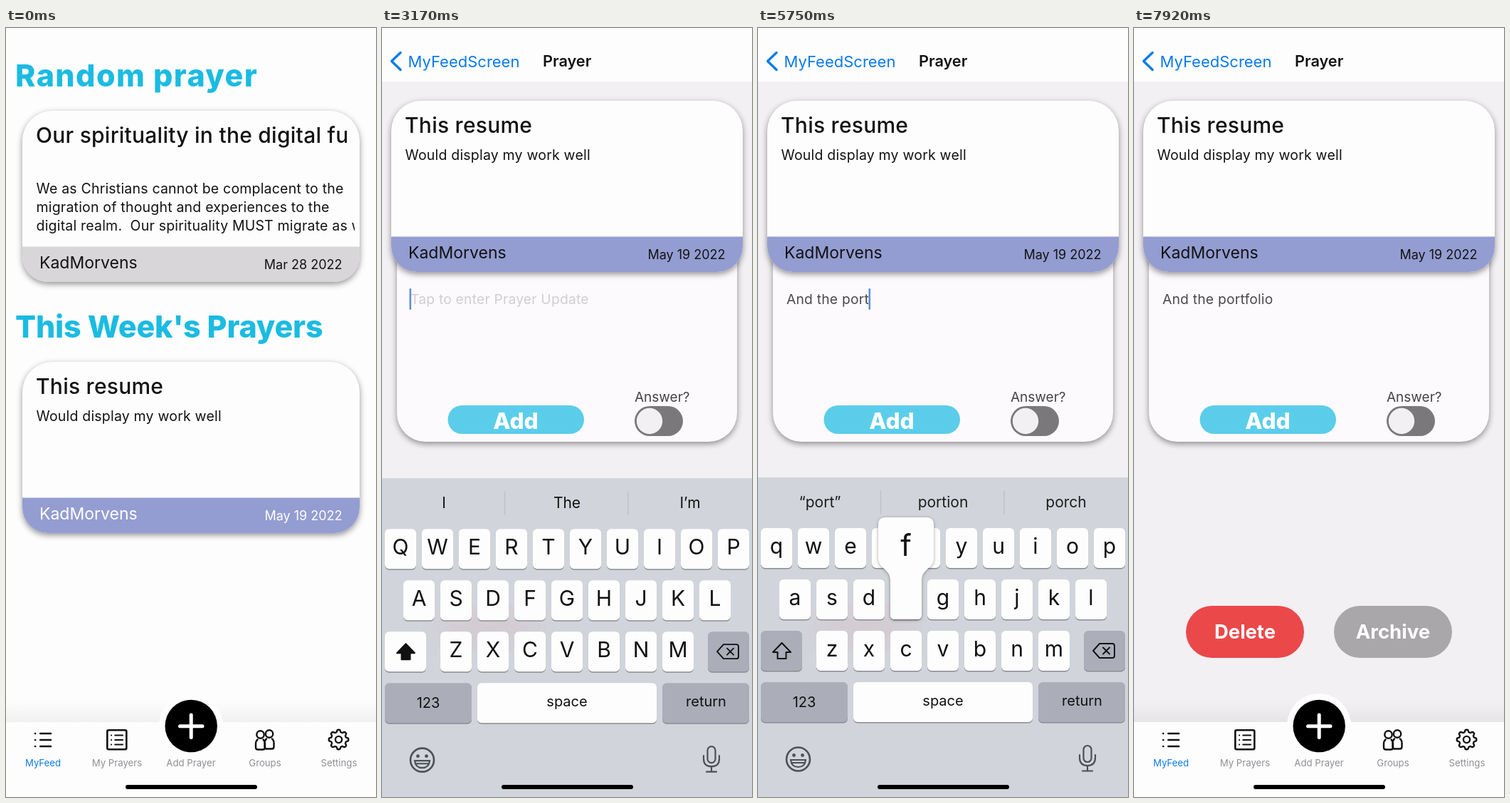
An HTML page for the animation above (8000 ms loop, 520 by 1078 pixels).

```html
<!DOCTYPE html>
<html lang="en">
<head>
<meta charset="utf-8">
<title>Prayer app</title>
<style>
  html, body { margin: 0; width: 100%; height: 100%; overflow: hidden; background: #fefdfe; }
  svg { display: block; width: 100vw; height: 100vh; }
  text { font-family: Inter, Roboto, sans-serif; font-optical-sizing: none; white-space: pre; }
  .lift { filter: drop-shadow(0 3px 4px rgba(0, 0, 0, .42)); }
  .line { fill: none; stroke-linecap: round; stroke-linejoin: round; }
</style>
</head>
<body>
<svg id="stage" viewBox="0 0 520 1078" xmlns="http://www.w3.org/2000/svg"></svg>
<script>
const LOOP = 8000, STEP = 1000 / 12;
const BLUE = '#0a7be6', INK = '#131214', LILAC = '#949dd1', USER = 'KadMorvens';
const KEYBOARD_TOP = 630, KEYBOARD_HEIGHT = 448;

const text = (x, y, size, str, attrs = '') =>
  `<text x="${x}" y="${y}" font-size="${size}" ${attrs}>${str}</text>`;
const mid = (x, y, size, str, attrs = '') => text(x, y, size, str, `text-anchor="middle" ${attrs}`);
const rect = (x, y, w, h, r, fill, attrs = '') =>
  `<rect x="${x}" y="${y}" width="${w}" height="${h}" rx="${r}" fill="${fill}" ${attrs}/>`;
const circle = (x, y, r, fill, attrs = '') => `<circle cx="${x}" cy="${y}" r="${r}" fill="${fill}" ${attrs}/>`;
const line = (d, color, width, attrs = '') =>
  `<path class="line" d="${d}" stroke="${color}" stroke-width="${width}" ${attrs}/>`;

function card({ id, x, y, w, title, body, bodyY, date, band, ink = INK }) {
  const lines = body.map((s, i) => text(x + 19.5, y + bodyY + 26 * i, 19.5, s, 'letter-spacing=".2"')).join('');
  const top = 42, low = 36;
  const shape = `M${x} ${y + top} a${top} ${top} 0 0 1 ${top} ${-top} h${w - 2 * top} a${top} ${top} 0 0 1 ${top} ${top}
    V${y + 240 - low} a${low} ${low} 0 0 1 ${-low} ${low} h${2 * low - w} a${low} ${low} 0 0 1 ${-low} ${-low} Z`;
  return `<g id="${id}">
    <clipPath id="${id}Shape"><path d="${shape}"/></clipPath>
    <clipPath id="${id}Title">${rect(x, y, w - 18, 80, 0, '#000')}</clipPath>
    <clipPath id="${id}Body">${rect(x, y, w - 7, 190, 0, '#000')}</clipPath>
    <path d="${shape}" fill="#fefdfe" class="lift"/>
    <g clip-path="url(#${id}Shape)">${rect(x, y + 190.5, w, 50, 0, band)}</g>
    <g fill="${INK}">
      <g clip-path="url(#${id}Title)">${text(x + 19, y + 44.5, 30, title, 'font-weight="500" letter-spacing=".25"')}</g>
      <g clip-path="url(#${id}Body)">${lines}</g>
    </g>
    <g fill="${ink}">${text(x + 24, y + 221, 23, USER)}
      ${text(x + w - 24.5, y + 222, 18, date, 'text-anchor="end"')}</g>
  </g>`;
}

function feedScreen() {
  const heading = 'font-weight="800" fill="#1bbbe2"';
  return `<g id="feed">${rect(0, 0, 520, 1078, 0, '#fefdfe')}
    ${text(13, 82, 43, 'Random prayer', heading + ' letter-spacing="1.4"')}
    ${card({ id: 'randomCard', x: 23, y: 116, w: 474, title: 'Our spirituality in the digital future',
      body: ['We as Christians cannot be complacent to the', 'migration of thought and experiences to the',
        'digital realm.  Our spirituality MUST migrate as well'],
      bodyY: 116, date: 'Mar 28 2022', band: '#d8d6d9' })}
    ${text(13, 434, 43, 'This Week\'s Prayers', heading + ' letter-spacing="-.2"')}
    ${card({ id: 'weekCard', x: 23, y: 468, w: 474, title: 'This resume', body: ['Would display my work well'],
      bodyY: 83, date: 'May 19 2022', band: LILAC, ink: '#fff' })}
  </g>`;
}

function prayerScreen() {
  const bold = 'font-weight="700" fill="#fff"';
  return `<g id="prayer">${rect(0, 0, 520, 1078, 0, '#f2f0f3')}${rect(0, 0, 520, 75, 0, '#fefdfe')}
    ${line('M26 34.5 L13.5 46.5 L26 58.5', BLUE, 3.4)}
    ${text(36.5, 54.5, 22, 'MyFeedScreen', `fill="${BLUE}"`)}
    ${text(226, 54, 21.7, 'Prayer', `font-weight="600" fill="${INK}"`)}
    <rect id="drawer" class="lift" fill="#fcfafc"/>
    ${line('M253 368 h14 M260 361 v14', '#8c8a8d', 3, 'id="drawerPlus"')}
    <g id="form">
      ${text(40, 386.5, 19.3, 'Tap to enter Prayer Update', 'id="hint" fill="#d0ced1" letter-spacing=".2"')}
      ${text(40, 386.5, 19.3, '', 'id="entry" fill="#4b494c" letter-spacing=".2"')}
      ${rect(0, 365, 2.6, 30, 1.3, '#5f8fdc', 'id="caret"')}
      ${rect(92.5, 529, 191.5, 40, 20, '#5bcdea')}
      ${mid(188, 562, 31.5, 'Add', 'font-weight="800" fill="#fff"')}
      ${text(355, 524, 19, 'Answer?', 'fill="#454346"')}
      ${rect(355, 530, 68, 42, 21, '#7a787b')}${circle(376, 551, 18.2, '#f2f0f3')}
    </g>
    ${card({ id: 'openCard', x: 13, y: 102, w: 494, title: 'This resume', body: ['Would display my work well'],
      bodyY: 83, date: 'May 19 2022', band: LILAC })}
    ${rect(73, 810, 166, 73, 36.5, '#eb484a')}${mid(156, 855.5, 27.4, 'Delete', bold)}
    ${rect(281, 810, 166, 73, 36.5, '#a9a7aa')}${mid(364, 855.5, 27.6, 'Archive', bold)}
  </g>`;
}

function gear(cx, cy) {
  const points = Array.from({ length: 96 }, (_, i) => {
    const a = i / 96 * Math.PI * 2, r = 12.2 + 1.6 * Math.tanh(2 * Math.cos(8 * a));
    return `${(cx + r * Math.cos(a)).toFixed(1)} ${(cy + r * Math.sin(a)).toFixed(1)}`;
  });
  return line(`M${points.join('L')}Z`, '#111', 2.4) + circle(cx, cy, 4.6, 'none', 'stroke="#111" stroke-width="2.4"');
}

function tabBar() {
  const rows = (x, x2, ys) => ys.map(y => `M${x} ${y} h.1 M${x + (x2 - x) * .33} ${y} H${x2}`).join(' ');
  const person = (x, y) => circle(x, y, 5.2, '#fefdfe', 'stroke="#111" stroke-width="2.4"') +
    line(`M${x - 4} ${y + 7} q-2.5 2 -2.5 6 v5 q0 3 3 3 h7 q3 0 3 -3 v-5 q0 -4 -2.5 -6`, '#111', 2.4);
  const labels = ['MyFeed', 'My Prayers', 'Add Prayer', 'Groups', 'Settings'];
  return `<linearGradient id="barShade" x2="0" y2="1"><stop stop-color="#000" stop-opacity="0"/>
      <stop offset="1" stop-color="#000" stop-opacity=".05"/></linearGradient>
    ${rect(0, 943, 520, 30, 0, 'url(#barShade)')}${rect(0, 973, 520, 105, 0, '#fefdfe')}
    ${circle(260, 978, 45, '#fefdfe')}${circle(260.2, 978.5, 36.7, '#000')}
    ${line('M244.5 978.7 h31.5 M260.2 963 v31.5', '#fff', 5)}
    ${line(rows(41, 63, [989, 998, 1007]), '#111', 2.6)}
    ${rect(142.3, 984.3, 27, 27, 2, 'none', 'stroke="#111" stroke-width="2.6"')}
    ${line(rows(148, 164, [991.5, 998, 1004.5]), '#111', 2.2)}
    ${person(370, 989.5)}${person(357.5, 990.5)}${gear(467.5, 997.5)}
    ${labels.map((s, i) => mid(52 + 104 * i, 1034.5, 13.2, s, `fill="${i ? '#8f8e92' : BLUE}"`)).join('')}`;
}

const keyAt = {};
function keyboard() {
  const plate = (x, y, w, fill, id = '') =>
    rect(x, y + 1.6, w, 56, 6, '#8a8c93') + rect(x, y, w, 56, 6, fill, id && `id="${id}"`);
  const rows = [['qwertyuiop', 4], ['asdfghjkl', 30], ['zxcvbnm', 82]];
  const letters = rows.map(([chars, left], r) => [...chars].map((c, i) => {
    const x = left + 52 * i, y = 701 + 72 * r;
    keyAt[c] = { x, y };
    return plate(x, y, 44, '#fefdfe') + mid(x + 22, y + 36, 30, c, `class="key" data-key="${c}"`);
  }).join('')).join('');
  const GREY = '#abaeb9', DARK = '#4c5057';
  return `<filter id="soft"><feGaussianBlur stdDeviation="22"/></filter>
  <g id="keyboard">${rect(0, KEYBOARD_TOP, 520, KEYBOARD_HEIGHT, 0, '#d2d4db')}
    <ellipse cx="150" cy="842" rx="75" ry="28" fill="#eb484a" opacity=".07" filter="url(#soft)"/>
    ${line('M172.5 649 v32 M346 649 v32', '#bfc1c9', 1.5)}
    ${rect(173.5, 639, 173, 51, 6, '#e9eaee', 'id="pick"')}
    <g id="words" fill="#111">${[87, 260, 433].map(x => mid(x, 672, 21, '')).join('')}</g>
    <g fill="#111">${letters}
      ${plate(4, 845, 58, GREY, 'shiftKey')}${plate(458, 845, 58, GREY)}
      ${plate(4, 917, 122, GREY)}${plate(134, 917, 252, '#fefdfe', 'spaceKey')}${plate(394, 917, 122, GREY)}
      ${mid(65, 951.5, 20, '123')}${mid(260, 950, 20, 'space')}${mid(455.5, 950, 20, 'return')}
    </g>
    ${line('M33.5 862 L46 875 H39.5 V884 H27.5 V875 H21 Z', '#111', 2, 'id="shiftIcon"')}
    ${line('M480 863 H498 q3 0 3 3 V880 q0 3 -3 3 H480 L471 873 Z M485 868.5 l9 9 M494 868.5 l-9 9', '#111', 1.9)}
    ${circle(56.5, 1025, 16.5, 'none', `stroke="${DARK}" stroke-width="2.6"`)}
    ${circle(50.5, 1019.5, 2.4, DARK)}${circle(62.5, 1019.5, 2.4, DARK)}
    <path d="M46 1026 h21 q-1 10 -10.5 10 t-10.5 -10 Z" fill="none" stroke="${DARK}" stroke-width="2.2"/>
    ${line('M48 1030 h17', DARK, 2)}
    ${rect(457.5, 1006, 11, 23, 5.5, 'none', `stroke="${DARK}" stroke-width="2.2"`)}
    ${line('M452 1019 v4 q0 11 11 11 t11 -11 v-4 M463 1034 v7 M456 1041.5 h14', DARK, 2.2)}
    <g id="popup" style="filter:drop-shadow(0 1px 2px rgba(0,0,0,.35))">
      <path id="bubble" fill="#fefdfe"/>${mid(0, 0, 42, '', 'id="popLetter" fill="#111"')}</g>
  </g>`;
}

const stage = document.getElementById('stage');
stage.innerHTML = feedScreen() + prayerScreen() + tabBar() + keyboard() +
  rect(168, 1061, 185, 6, 3, '#000');

const el = id => document.getElementById(id);
const set = (id, attrs) => { for (const k in attrs) el(id).setAttribute(k, attrs[k]); };
const show = (id, on) => set(id, { visibility: on ? 'visible' : 'hidden' });
const clamp = v => Math.max(0, Math.min(1, v));
const mix = (a, b, p) => a + (b - a) * p;
const ease = p => (p = clamp(p)) < .5 ? 2 * p * p : 1 - 2 * (1 - p) ** 2;
// critically damped spring, 0 to 1
const spring = ms => { const u = Math.max(0, ms) * .01826; return 1 - (1 + u) * Math.exp(-u); };

const PUSH = 1416, OPEN = 2090, FOCUS = 2718, BLUR = 7150, COMMIT = 80, HOLD = 110;
const phrase = 'And the portfolio';
const downs = [3670, 3870, 4060, 4240, 4480, 4620, 4780, 4940, 5140, 5290, 5430, 5580, 5740, 5880, 6020, 6160, 6310];
const suggestions = [
  [0, '', '', ''], [2850, 'I', 'The', 'I’m'], [3790, '“A”', 'And', 'At'], [3990, '“An”', 'And', 'Any'],
  [4180, '“And”', 'Andante', 'Andiron'], [4320, 'the', 'I', 'I’m'], [4600, '“t”', 'the', 'to'],
  [4900, '“the”', 'then', 'they'], [5060, 'first', 'same', 'other'], [5260, '“p”', 'people', 'pray'],
  [5600, '“port”', 'portion', 'porch'], [5900, '“portf”', 'portfolio', 'portfolios'],
  [6180, '“portfol”', 'portfolio', 'portfolios'], [6480, 'portfolio', 'portfolios', 'portfolio’s']
];

function drawPopup(char) {
  const { x, y } = keyAt[char.toLowerCase()];
  const left = Math.max(4, Math.min(438, x - 17)), right = left + 78, top = y - 87;
  set('bubble', { d: `M${left + 10} ${top} H${right - 10} q10 0 10 10 V${y - 30}
    C${right} ${y - 14} ${x + 44} ${y - 16} ${x + 44} ${y + 2} V${y + 50} q0 6 -6 6 H${x + 6} q-6 0 -6 -6 V${y + 2}
    C${x} ${y - 16} ${left} ${y - 14} ${left} ${y - 30} V${top + 10} q0 -10 10 -10 Z` });
  set('popLetter', { x: left + 39, y: y - 33 });
  el('popLetter').textContent = char;
}

function drawTyping(t) {
  const count = downs.filter(d => t >= d + COMMIT).length;
  el('entry').textContent = phrase.slice(0, count);
  show('hint', count === 0);
  const idle = t - (count ? downs[count - 1] + COMMIT : FOCUS - 80);
  const focused = t >= FOCUS - 80 && t < BLUR;
  show('caret', focused && (idle < 550 || idle % 1000 < 550));
  set('caret', { x: 38.5 + (count ? el('entry').getComputedTextLength() + 1 : 0) });

  const active = downs.findIndex(d => t >= d && t < d + HOLD);
  const char = phrase[active];
  const letter = active >= 0 && char !== ' ';
  show('popup', letter);
  if (letter) drawPopup(char);
  set('spaceKey', { fill: char === ' ' ? '#abaeb9' : '#fefdfe' });

  const upper = count === 0;
  document.querySelectorAll('.key').forEach(k => {
    k.textContent = upper ? k.dataset.key.toUpperCase() : k.dataset.key;
  });
  set('shiftKey', { fill: upper ? '#fefdfe' : '#abaeb9' });
  el('shiftIcon').style.fill = upper ? '#111' : 'none';

  const [since, ...words] = suggestions.filter(s => t >= s[0]).pop();
  [...el('words').children].forEach((w, i) => { w.textContent = words[i]; });
  set('words', { opacity: clamp((t - since) / 160) });
  show('pick', since >= 5900 && since < 6480);
}

function draw(t) {
  const push = t > PUSH + 420 ? 1 : spring(t - PUSH);
  set('feed', { transform: `translate(${-156 * push} 0)` });
  set('prayer', { transform: `translate(${520 * (1 - push)} 0)` });
  const pressed = ease((t - 1170) / 150) - ease((t - 1410) / 250);
  set('weekCard', { opacity: 1 - .8 * pressed });

  const open = ease((t - OPEN) / 420);
  set('drawer', {
    x: mix(208, 21, open), y: 290, width: mix(104, 478, open),
    height: mix(97, 290, open), rx: mix(12, 40, open)
  });
  set('drawerPlus', { opacity: clamp(1 - open * 3) });
  set('form', { opacity: clamp(open * 2 - 1) });

  const raised = spring(t - FOCUS) - spring(t - BLUR);
  drawTyping(t);
  set('keyboard', {
    transform: `translate(0 ${KEYBOARD_HEIGHT * (1 - raised)})`,
    display: t >= FOCUS && raised > .002 ? 'inline' : 'none'
  });
}

function tick() {
  const frame = Math.floor((performance.now() % LOOP + 4) / STEP);
  draw(frame * STEP % LOOP);
  requestAnimationFrame(tick);
}
tick();
</script>
</body>
</html>
```
